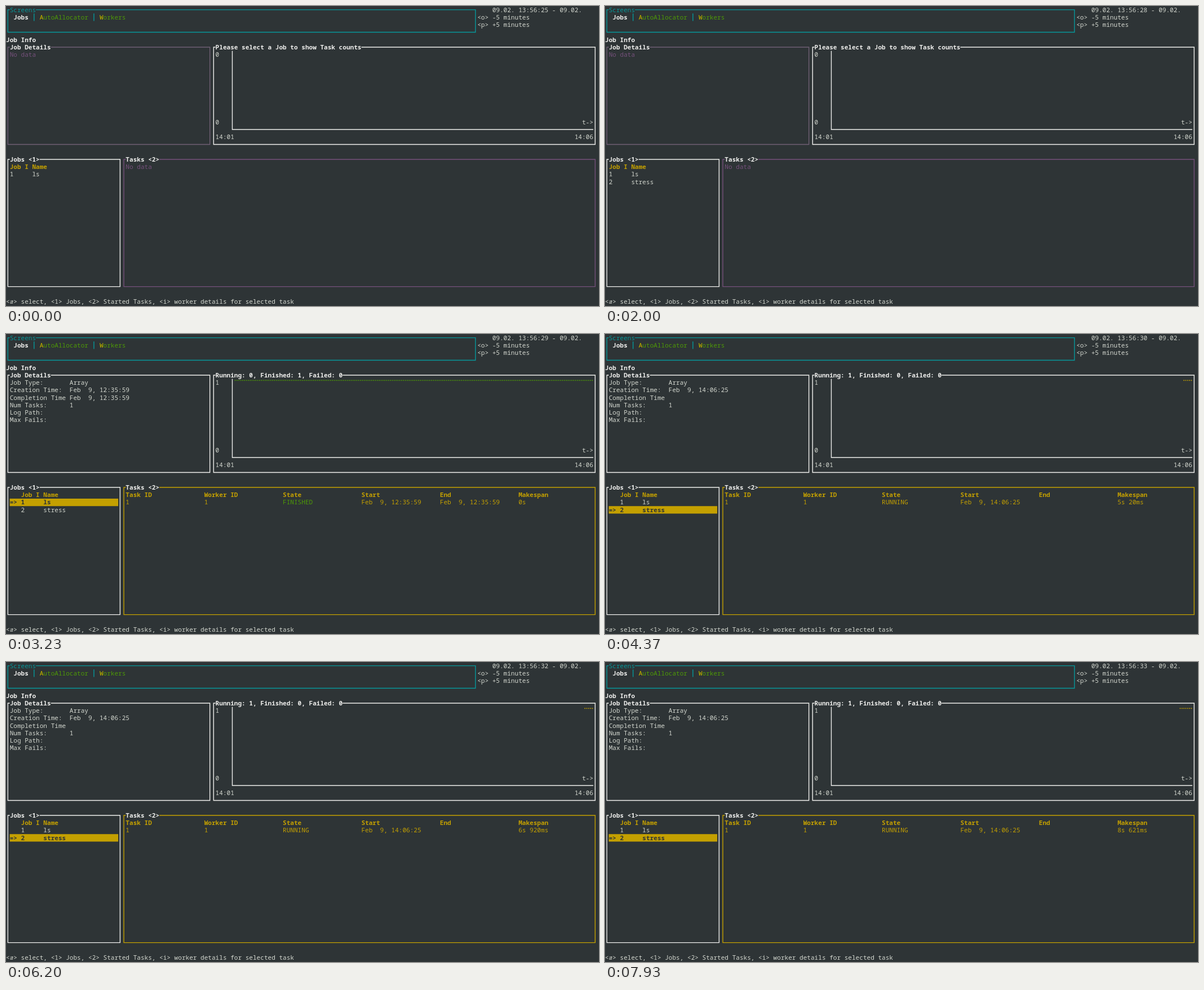
Animation, 1052 px wide and 532 px high, one loop 8 s. Source, as an HTML page with a canvas:

```html
<!DOCTYPE html>
<html lang="en">
<head>
<meta charset="utf-8">
<title>Job dashboard</title>
<style>
html, body { margin: 0; height: 100%; overflow: hidden; background: #2e3436; }
canvas { display: block; }
</style>
</head>
<body>
<canvas id="screen" width="1052" height="532"></canvas>
<script>
const ctx = document.getElementById('screen').getContext('2d');
const CELL_W = 6.636, CELL_H = 13.27, LOOP = 8000;
const BG = '#2e3436', FG = '#d3d7cf', WHITE = '#eeeeec', GOLD = '#c4a000',
  GREEN = '#4e9a06', TEAL = '#06989a', PURPLE = '#75507b', DIM = '#6f5f74';
const TASK_COLS = [32, 53, 74, 95, 116, 137];
const CLOCK_TICKS = [130, 1300, 2000, 3030, 4070, 5030, 6000, 7000];

const midX = col => (col + 0.5) * CELL_W;
const midY = row => (row + 0.5) * CELL_H;

// Text sits on the terminal's character grid.
function text(str, col, row, color = FG, bold = false) {
  ctx.font = `${bold ? 'bold ' : ''}11.06px "Noto Sans Mono", "DejaVu Sans Mono", monospace`;
  ctx.fillStyle = color;
  const y = Math.round(row * CELL_H + 10.5);
  [...str].forEach((ch, i) => {
    if (ch !== ' ') ctx.fillText(ch, midX(col + i), y);
  });
}

function line(color, ...points) {
  ctx.strokeStyle = color;
  ctx.lineWidth = 1.4;
  ctx.beginPath();
  points.forEach(([x, y]) => ctx.lineTo(x, y));
  ctx.stroke();
}

function panel(left, top, right, bottom, title, color, titleColor = WHITE) {
  const x0 = midX(left), x1 = midX(right), y0 = midY(top), y1 = midY(bottom);
  const titleEnd = (left + 1 + title.length) * CELL_W;
  line(color, [titleEnd, y0], [x1, y0], [x1, y1], [x0, y1], [x0, y0], [(left + 1) * CELL_W, y0]);
  text(title, left + 1, top, titleColor, titleColor === WHITE);
}

function header(t) {
  panel(0, 0, 125, 3, 'Screens', TEAL, TEAL);
  text('Jobs', 2, 1, WHITE, true);
  text('AutoAllocator', 9, 1, GREEN);
  text('A', 9, 1, GOLD);
  text('Workers', 25, 1, GREEN);
  text('W', 25, 1, GOLD);
  for (const col of [7, 23]) line(TEAL, [midX(col), CELL_H], [midX(col), 2 * CELL_H]);
  const seconds = 25 + CLOCK_TICKS.filter(tick => t >= tick).length;
  text(`09.02. 13:56:${seconds} - 09.02.`, 130, 0);
  text('<o> -5 minutes', 126, 1);
  text('<p> +5 minutes', 126, 2);
  text('Job Info', 0, 4, WHITE, true);
}

function details(job) {
  panel(0, 5, 54, 18, 'Job Details', job ? WHITE : DIM);
  if (!job) return text('No data', 1, 6, PURPLE);
  const rows = [['Job Type:', 'Array'], ['Creation Time:', job.start],
    ['Completion Time', job.end], ['Num Tasks:', '1'], ['Log Path:', ''], ['Max Fails:', '']];
  rows.forEach(([label, value], i) => {
    text(label, 1, 6 + i);
    text(value, 17, 6 + i);
  });
}

function chart(job) {
  panel(55, 5, 157, 18, job ? job.counts : 'Please select a Job to show Task counts', WHITE);
  line(WHITE, [midX(60), 6 * CELL_H], [midX(60), midY(16)], [157 * CELL_W, midY(16)]);
  text(job ? '1' : '0', 56, 6);
  text('0', 56, 15);
  text('t->', 154, 15);
  text('14:01', 56, 17);
  text('14:06', 152, 17);
  if (!job) return;
  ctx.fillStyle = job.color;
  for (let i = 0; i < job.dots; i++) {
    ctx.fillRect(1039.5 - i * CELL_W / 2, 81.5, 1.7, 1.6);
  }
}

function jobList(selected, count) {
  panel(0, 20, 30, 37, 'Jobs <1>', WHITE);
  const col = selected ? 4 : 1;
  text('Job I Name', col, 21, GOLD, true);
  ['ls', 'stress'].slice(0, count).forEach((name, i) => {
    const row = 22 + i, active = selected === i + 1, color = active ? BG : FG;
    if (active) {
      ctx.fillStyle = GOLD;
      ctx.fillRect(CELL_W, row * CELL_H, 29 * CELL_W, CELL_H);
      text('=>', 1, row, BG, true);
    }
    text(String(i + 1), col, row, color, active);
    text(name, col + 6, row, color, active);
  });
}

function tasks(job) {
  panel(31, 20, 157, 37, 'Tasks <2>', job ? GOLD : PURPLE);
  if (!job) return text('No data', 32, 21, PURPLE);
  const heads = ['Task ID', 'Worker ID', 'State', 'Start', 'End', 'Makespan'];
  const values = ['1', '1', job.state, job.start, job.end, job.makespan];
  TASK_COLS.forEach((col, i) => {
    text(heads[i], col, 21, GOLD, true);
    text(values[i], col, 22, i === 2 ? job.color : GOLD);
  });
}

function finishedJob() {
  const time = 'Feb  9, 12:35:59';
  return { start: time, end: time, state: 'FINISHED', color: GREEN, makespan: '0s',
    counts: 'Running: 0, Finished: 1, Failed: 0', dots: 192 };
}

function runningJob(t) {
  const ms = 5720 + 100 * Math.floor((t - 5000) / 100) + (t >= 7750 ? 1 : 0);
  return { start: 'Feb  9, 14:06:25', end: '', state: 'RUNNING', color: GOLD,
    makespan: `${Math.floor(ms / 1000)}s ${ms % 1000}ms`,
    counts: 'Running: 1, Finished: 0, Failed: 0', dots: 5 + (t >= 6300) + (t >= 7200) };
}

// The pointer sweeps down across the screen, then leaves upwards to the right.
function pointer(t) {
  const step = Math.floor(t * 0.03 + 0.1);
  if (step < 10 || step > 26) return;
  const u = (step - 10) / 13, v = Math.max(0, (step - 23) / 3);
  const x = v ? 750 + 269 * v : 142 + 608 * u;
  const y = v ? 202 * (1 - v * v) : 202 * Math.sin(u * Math.PI / 2);
  ctx.save();
  ctx.translate(x, y);
  const arrow = new Path2D('M0 0V8.2L1.9 6.5L3.2 9.6L4.6 9L3.3 6H5.6Z');
  ctx.strokeStyle = '#111';
  ctx.lineWidth = 1.2;
  ctx.stroke(arrow);
  ctx.fillStyle = '#fff';
  ctx.fill(arrow);
  ctx.restore();
}

function draw(now) {
  const t = now % LOOP;
  const selected = t < 3230 ? 0 : t < 4370 ? 1 : 2;
  const job = [null, finishedJob(), runningJob(t)][selected];
  ctx.fillStyle = BG;
  ctx.fillRect(0, 0, 1052, 532);
  ctx.textAlign = 'center';
  header(t);
  details(job);
  chart(job);
  jobList(selected, t < 130 ? 1 : 2);
  tasks(job);
  text('<⇵> select, <1> Jobs, <2> Started Tasks, <i> worker details for selected task', 0, 39);
  pointer(t);
}

let start;
function tick(now) {
  start ??= now;
  draw(now - start);
  requestAnimationFrame(tick);
}
requestAnimationFrame(tick);
</script>
</body>
</html>
```
